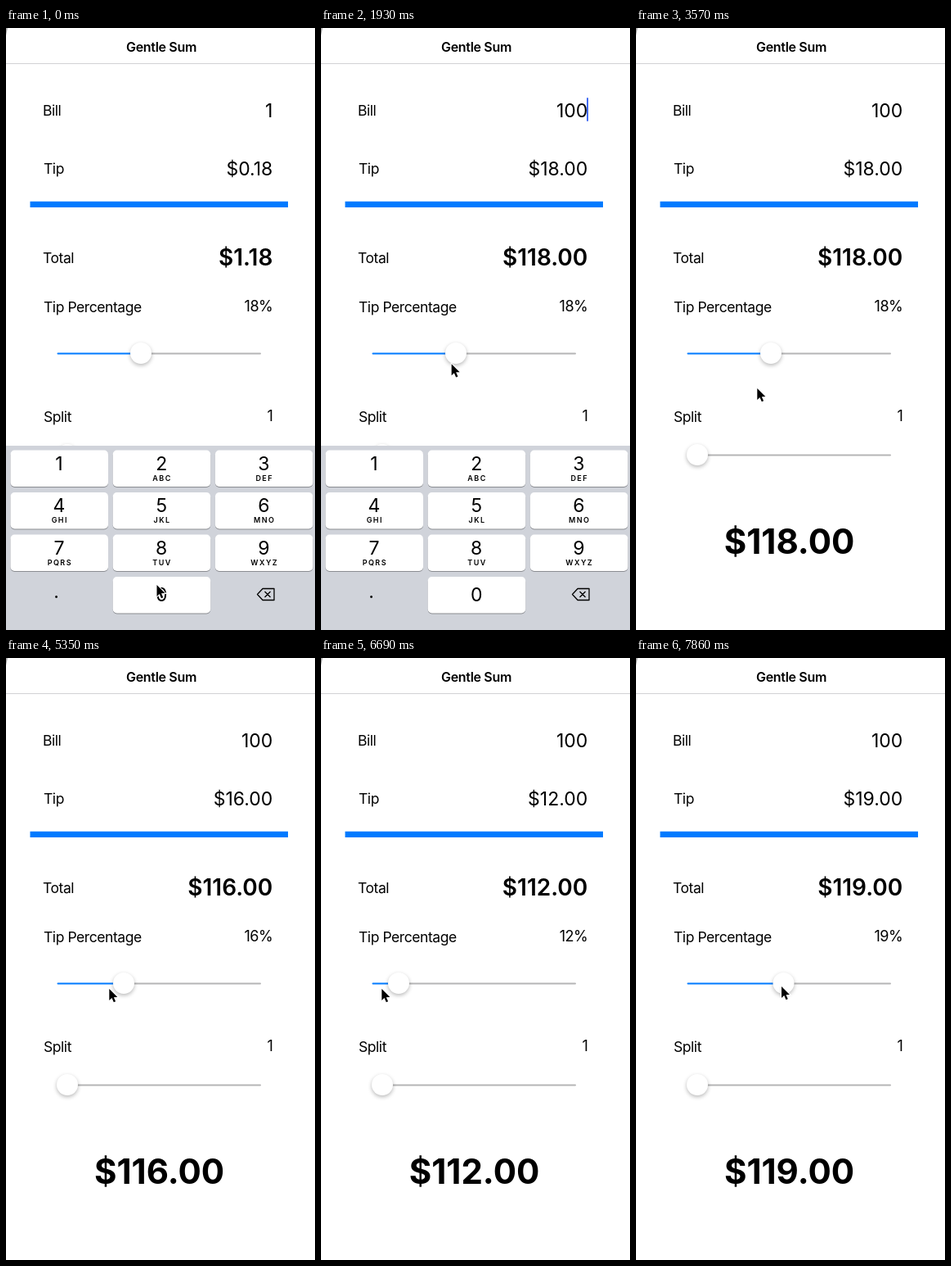
Recreate the animation shown at these times as an HTML page with a canvas. Size 378 by 735 pixels, loop 8000 ms.

```html
<!DOCTYPE html>
<html lang="en">
<head>
<meta charset="utf-8">
<title>Gentle Sum</title>
<style>
  html, body { margin: 0; width: 100%; height: 100%; overflow: hidden; background: #fff; }
  canvas { display: block; }
</style>
</head>
<body>
<canvas id="stage" width="378" height="735"></canvas>
<script>
const ctx = document.getElementById('stage').getContext('2d');
const LOOP = 8000, STEP = 148.3;
const BLUE = '#007aff', INK = '#000';
const RIGHT = 326.3;               // right edge of the figures
const TYPED = 2, DISMISS = 20;     // steps: first new digit, keyboard starts to leave

// Key points [step, value...], linear in between
const POINTER = [
  [6, 184.5, 680], [7, 176.5, 459], [12, 160, 460], [18, 158, 161], [21, 158, 161], [24, 148.3, 440],
  [28, 157, 404], [33, 157, 404], [36, 126.3, 404], [45, 74.3, 404], [48, 70, 404], [53, 178, 401]
];
const THUMB = [[33, 165], [36, 144], [45, 95], [48, 89], [53, 180.5]];

const clamp = v => Math.min(1, Math.max(0, v));
const ease = v => { const k = clamp(v); return k * k * (3 - 2 * k); };

function at(points, n) {
  const next = points.findIndex(p => p[0] >= n);
  const b = points[next], a = points[Math.max(0, next - 1)];
  const k = a === b ? 0 : (n - a[0]) / (b[0] - a[0]);
  return a.slice(1).map((v, j) => v + (b[j + 1] - v) * k);
}

function caretAlpha(n) {
  if (n < TYPED || n > DISMISS) return 0;
  return n < 6 ? 1 : clamp(.5 + .9 * Math.cos((n - 5.4) / 6.8 * 2 * Math.PI));
}

function text(str, x, y, size, { weight = 400, align = 'left', spacing = 0 } = {}) {
  ctx.font = `${weight} ${size}px Inter, sans-serif`;
  ctx.letterSpacing = `${spacing * size}px`;
  ctx.textAlign = align;
  ctx.fillStyle = INK;
  ctx.fillText(str, x, y);
}

const label = (str, x, y) => text(str, x, y, 17.5, { spacing: -.025 });
const figure = (str, y, size, weight) => text(str, RIGHT, y, size, { weight, align: 'right' });
const smallFigure = (str, y) => text(str, RIGHT, y, 18, { align: 'right', spacing: -.025 });

function rect(x, y, w, h, color, radius = 0) {
  ctx.fillStyle = color;
  ctx.beginPath();
  ctx.roundRect(x, y, w, h, radius);
  ctx.fill();
}

function polygon(points) {
  ctx.beginPath();
  points.forEach(([x, y]) => ctx.lineTo(x, y));
  ctx.closePath();
}

function slider(x, y) {
  rect(62.5, y - .5, x - 62.5, 2, BLUE, 1);
  rect(x, y - .5, 312 - x, 2, '#b5b5b6', 1);
  ctx.save();
  ctx.shadowColor = 'rgba(0,0,0,.28)';
  ctx.shadowBlur = 5;
  ctx.shadowOffsetY = 2;
  rect(x - 13, y - 13, 26, 26, '#fff', 13);
  ctx.restore();
}

function form(bill, thumbX, caret) {
  const percent = Math.round(10 + 20 * (thumbX - 75) / 224);
  const tip = bill * percent / 100;
  const money = v => '$' + v.toFixed(2);

  polygon([[0, 0], [2, 0], [0, 9]]);
  ctx.fillStyle = '#aaa';
  ctx.fill();
  text('Gentle Sum', 190, 29, 16, { weight: 600, align: 'center', spacing: -.02 });
  rect(0, 43, 378, 1, '#d2d2d4');

  label('Bill', 45, 107);
  label('Tip', 46, 178);
  label('Total', 45, 286.5);
  label('Tip Percentage', 46, 347);
  label('Split', 46, 481);

  figure(bill, 108.5, 23);
  figure(money(tip), 180, 23);
  rect(29.5, 211.7, 315.5, 7.2, BLUE);
  figure(money(bill + tip), 290, 28, 600);
  smallFigure(percent + '%', 346);
  smallFigure('1', 480);
  text(money(bill + tip), 187.5, 642, 42, { weight: 700, align: 'center' });

  slider(thumbX, 397);
  slider(75, 521);

  ctx.globalAlpha = caret;
  rect(325, 85, 2, 29, '#426bf2', 1);
  ctx.globalAlpha = 1;
}

function key(col, row, digit, letters, pressed) {
  const x = 5.5 + col * 125.2, y = 515.5 + row * 51.5, mid = x + 59.5;
  rect(x, y + 1, 119.5, 44.5, '#8b8d92', 5);
  rect(x, y, 119.5, 44.5, pressed ? '#b9bec8' : '#fff', 5);
  text(digit, mid, y + (row === 3 ? 29.5 : 24), 23, { align: 'center' });
  text(letters, mid + .8, y + 37, 9, { weight: 600, align: 'center', spacing: .16 });
}

function keyboard(drop, pressed) {
  ctx.save();
  ctx.translate(0, drop);
  rect(0, 510, 378, 225, '#d0d3da');
  ['', 'ABC', 'DEF', 'GHI', 'JKL', 'MNO', 'PQRS', 'TUV', 'WXYZ'].forEach((letters, i) =>
    key(i % 3, Math.floor(i / 3), i + 1, letters, false));
  key(1, 3, 0, '', pressed);
  text('.', 61.5, 696, 23, { align: 'center' });

  ctx.strokeStyle = INK;
  ctx.lineWidth = 1.3;
  ctx.lineJoin = 'round';
  polygon([[307.5, 691.5], [314, 684.5], [328, 684.5], [328, 698.5], [314, 698.5]]);
  ctx.moveTo(316.5, 688); ctx.lineTo(323.5, 695);
  ctx.moveTo(323.5, 688); ctx.lineTo(316.5, 695);
  ctx.stroke();
  ctx.restore();
}

function pointer(x, y) {
  ctx.save();
  ctx.translate(x, y);
  polygon([[0, 0], [0, 14], [3.2, 11], [5.5, 16.3], [7.8, 15.3], [5.5, 10.2], [10, 10]]);
  ctx.strokeStyle = '#fff';
  ctx.lineWidth = 2;
  ctx.stroke();
  ctx.fillStyle = INK;
  ctx.fill();
  ctx.restore();
}

function draw(now) {
  const n = Math.floor(now % LOOP / STEP);
  const bill = n < TYPED ? 1 : n < 2 * TYPED ? 10 : 100;
  rect(0, 0, 378, 735, '#fff');
  form(bill, at(THUMB, n)[0], caretAlpha(n));
  keyboard(225 * ease((n - DISMISS) / 3), n === 1 || n === 3);
  pointer(...at(POINTER, n));
}

const start = performance.now();
function tick() {
  draw(performance.now() - start);
  requestAnimationFrame(tick);
}
tick();
</script>
</body>
</html>
```
